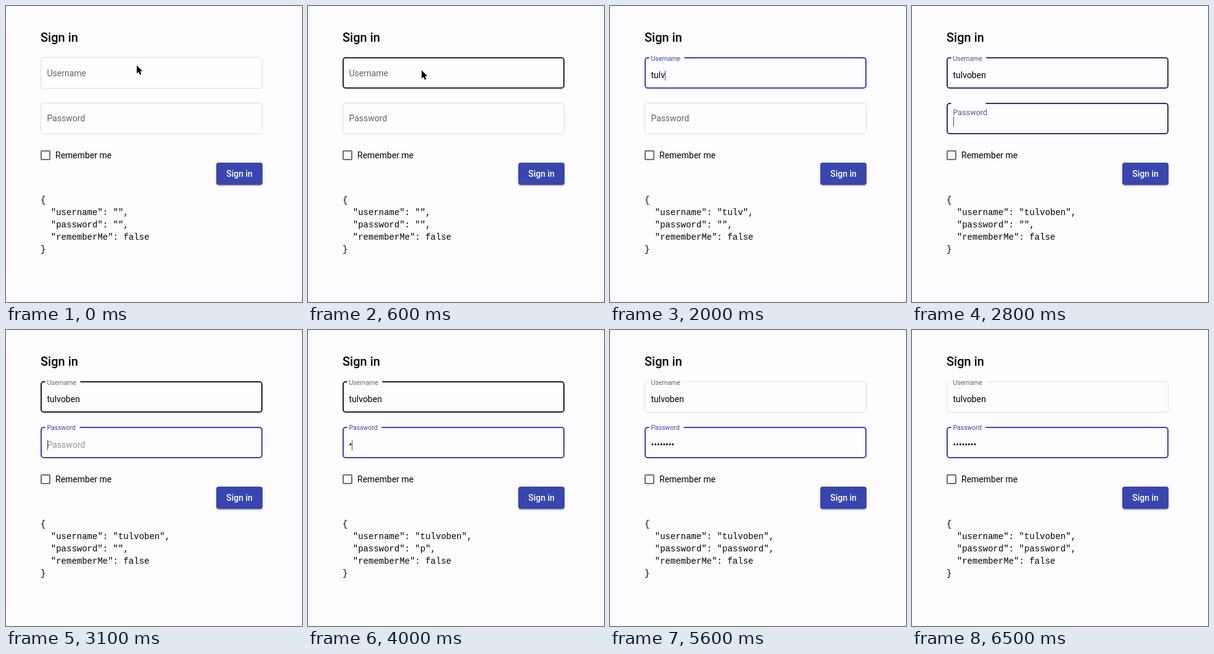
Write an HTML page that moves like this. It is 480 by 480 pixels and loops after 6.6 s.

```html
<!DOCTYPE html>
<html lang="en">
<head>
<meta charset="utf-8">
<style>
  html, body { margin: 0; width: 100%; height: 100%; overflow: hidden; background: #fefcff; }
  svg { position: absolute; left: 0; top: 0; }
  svg text { font: 14px Roboto, sans-serif; }
  svg .medium { font-weight: 500; }
  svg .title { font-size: 20px; }
  pre { position: absolute; left: 56px; top: 305px; margin: 0; font: 14px/20px "Liberation Mono", monospace; color: #000; }
  .button {
    position: absolute; left: 341px; top: 254px; width: 75px; height: 36px; border-radius: 4px;
    background: #3846ad; color: #fff; font: 500 14px/36px Roboto, sans-serif; text-align: center;
    box-shadow: 0 3px 1px -2px #0003, 0 2px 2px #00000024, 0 1px 5px #0000001f;
  }
</style>
</head>
<body>
<pre id="json"></pre>
<div class="button">Sign in</div>
<svg width="480" height="480" viewBox="0 0 480 480">
  <text class="medium title" x="56" y="58">Sign in</text>
  <rect x="57" y="235" width="14" height="14" rx="1" fill="none" stroke="#000" stroke-opacity=".56" stroke-width="2"/>
  <text x="80" y="247">Remember me</text>
  <g id="fields"></g>
  <path id="mouse" d="M0 0V13.2L3 10.4L5 15.2L7.3 14.2L5.3 9.5H9.4Z" stroke="#fff" paint-order="stroke" stroke-width="1.6"/>
</svg>
<script>
const LOOP = 6600, STEP = 100, TEXT_X = 66.5;
const BLUE = [56, 70, 173], DARK = [32, 32, 32], GREY = [102, 101, 102];
const $ = id => document.getElementById(id);
const clamp = v => Math.min(1, Math.max(0, v));
const mix = (a, b, k) => a + (b - a) * k;
const color = (a, b, k) => `rgb(${a.map((v, i) => mix(v, b[i], k))})`;

// cubic-bezier(.25, .8, .25, 1)
function ease(x) {
  x = clamp(x);
  let lo = 0, hi = 1;
  for (let i = 0; i < 20; i++) {
    const s = (lo + hi) / 2, r = 1 - s;
    if (.75 * s * r + s ** 3 < x) lo = s; else hi = s;
  }
  return 2.4 * lo * (1 - lo) ** 2 + 3 * lo * lo * (1 - lo) + lo ** 3;
}

// Transition progress as sampled shortly after its trigger
const since = (t, start, length) => t < start ? 0 : ease((t - start + 50) / length);

const fields = [
  { label: "Username", value: "tulvoben", top: 83, labelY: 114, textY: 117, gapEnd: 120.5,
    focus: 700, blur: 2800, hover: [300, 5600],
    keys: [1600, 1800, 1900, 2000, 2100, 2300, 2400, 2500] },
  { label: "Password", value: "password", top: 157, labelY: 187, textY: 191, gapEnd: 119.5, masked: true,
    focus: 2800, blur: LOOP, hover: [LOOP, LOOP],
    keys: [3900, 4100, 4200, 4300, 4500, 4700, 4800, 5000] }
];

for (const f of fields) {
  const g = document.createElementNS("http://www.w3.org/2000/svg", "g");
  g.innerHTML = `<path fill="none" stroke="#000" stroke-opacity=".13"/>
    <path fill="none" stroke-width="2"/>
    <text>${f.label}</text>
    <text x="${TEXT_X}" y="${f.textY}">${f.label}</text>
    <text x="${TEXT_X}" y="${f.textY}"></text>
    <rect y="${f.textY - 12}" width="1" height="16" fill="${color(BLUE, BLUE, 0)}"/>`;
  $("fields").append(g);
  [f.thin, f.thick, f.name, f.hint, f.text, f.caret] = g.children;
}

function outline(top, inset, gapEnd) {
  const l = 56 + inset, r = 416 - inset, y = top + inset, b = top + 51 - inset, c = 5 - inset;
  const arc = (x, y) => `A${c} ${c} 0 0 1 ${x} ${y}`;
  return `M${gapEnd} ${y}H${r - c}${arc(r, y + c)}V${b - c}${arc(r - c, b)}` +
    `H${l + c}${arc(l, b - c)}V${y + c}${arc(l + c, y)}H63.5`;
}

function drawField(f, t) {
  const focused = t >= f.focus && t < f.blur;
  const floated = t >= f.focus;
  const [enter, leave] = f.hover;
  const typed = f.keys.filter(k => k <= t);
  f.typed = f.value.slice(0, typed.length);

  const thick = focused ? 1 : t < leave ? since(t, enter, 600) : 0;
  const gapEnd = floated ? f.gapEnd : 63.5;
  f.thin.setAttribute("d", outline(f.top, .5, gapEnd));
  f.thin.setAttribute("opacity", 1 - thick);
  f.thick.setAttribute("d", outline(f.top, 1, gapEnd));
  f.thick.setAttribute("opacity", thick);
  f.thick.setAttribute("stroke", color(DARK, BLUE, since(t, f.focus, 300) - since(t, f.blur, 300)));

  const lift = since(t, f.focus, 400);
  f.name.setAttribute("transform", `translate(${TEXT_X} ${f.labelY - 25 * lift}) scale(${1 - lift / 4})`);
  f.name.setAttribute("fill", color(GREY, BLUE, lift - since(t, f.blur, 400)));

  f.hint.setAttribute("fill-opacity", typed.length ? 0 : .44 * since(t, f.focus + 133, 400));
  f.text.textContent = f.masked ? "•".repeat(typed.length) : f.typed;

  const lastInput = typed.length ? typed[typed.length - 1] : f.focus;
  f.caret.setAttribute("x", Math.round(TEXT_X + f.text.getComputedTextLength()));
  f.caret.setAttribute("opacity", focused && (t - lastInput) % 1000 < 500 ? 1 : 0);
}

function draw(now) {
  const t = Math.floor(now % LOOP / STEP) * STEP;
  for (const f of fields) drawField(f, t);

  const u = clamp((t - 200) / 400), k = u * u * (3 - 2 * u);
  $("mouse").setAttribute("transform", `translate(${mix(212, 184.3, k)} ${mix(96.3, 104.3, k)})`);
  $("mouse").setAttribute("opacity", t < 1600 ? 1 : 0);

  const [username, password] = fields.map(f => f.typed);
  $("json").textContent = JSON.stringify({ username, password, rememberMe: false }, null, 2);
  requestAnimationFrame(draw);
}
requestAnimationFrame(draw);
</script>
</body>
</html>
```
